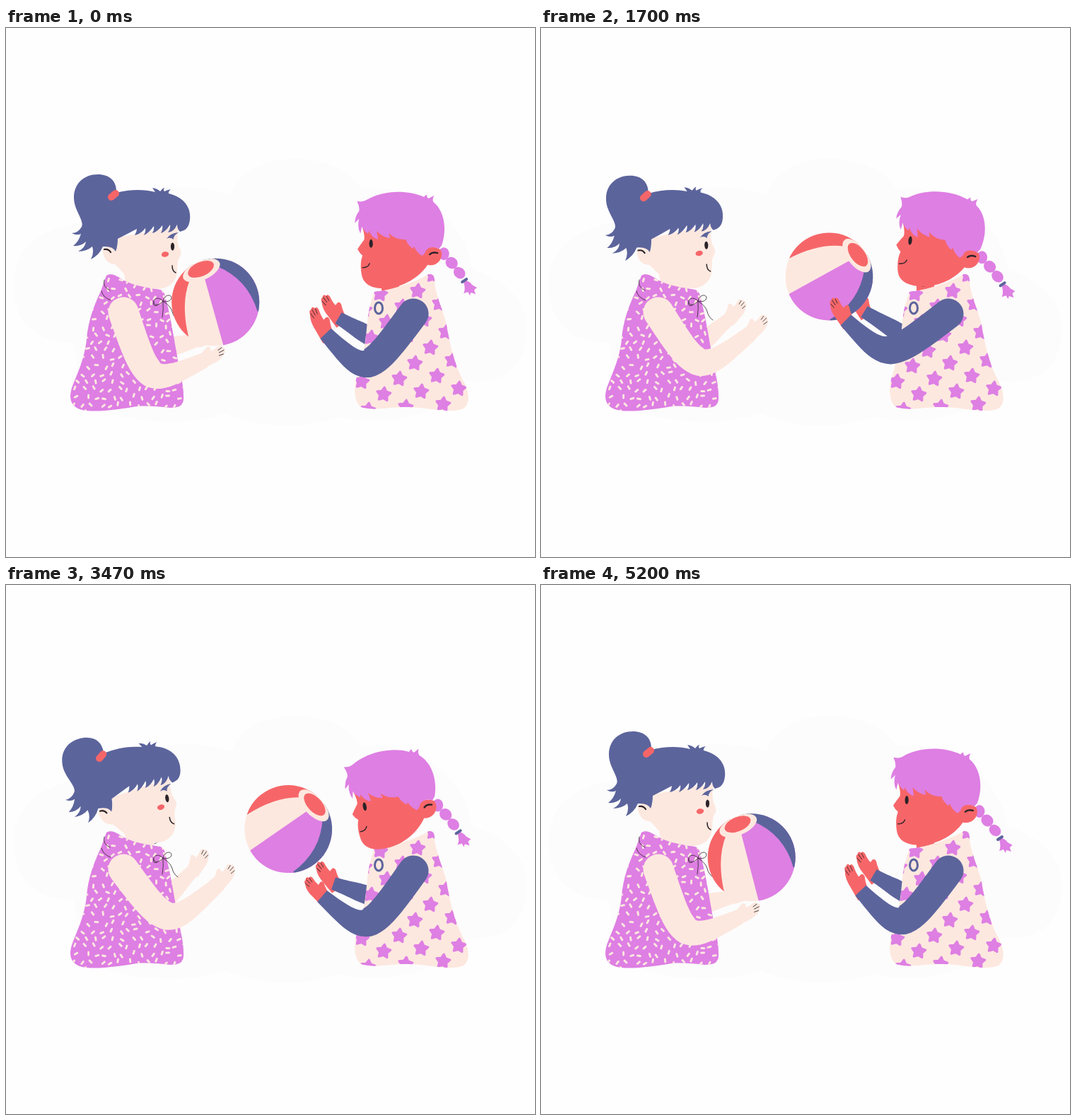
Recreate the animation shown at these times as an HTML page. Size 748 by 748 pixels, loop 5260 ms.

```html
<!DOCTYPE html>
<html lang="en">
<head>
<meta charset="utf-8">
<title>Playing catch</title>
<style>
  html, body { margin: 0; width: 100%; height: 100%; overflow: hidden; background: #fefefe; }
  svg { display: block; width: 100vw; height: 100vh; }
  .navy { fill: #5c649c; }
  .plum { fill: #de7fe3; }
  .peach { fill: #fde8df; }
  .red { fill: #f66669; }
  .ink { fill: #2b2328; }
  .line { fill: none; stroke: #2b2328; stroke-linecap: round; stroke-linejoin: round; }
</style>
</head>
<body>
<svg viewBox="0 0 748 748">
  <defs>
    <clipPath id="dressClip"><use href="#dress"/></clipPath>
    <clipPath id="smockClip"><use href="#smock"/></clipPath>
    <clipPath id="ballClip"><circle r="62"/></clipPath>
    <path id="palm" d="M-8 -10Q3 -11 11 -16Q17 -17 14 -8Q19 -7 26 -9Q31 -9 29.500 -5Q34 -3 30.500 1Q31 5 27 6Q20 12 8 11L-8 11Z"/>
    <path id="fingers" class="line" stroke-width=".8" d="M23 -4L29 -5M23 0L30 0M21 4L27 5"/>
  </defs>

  <path fill="#fcfcfc" d="M11 365C10 305 60 278 125 272C175 222 265 215 318 236C340 170 465 168 503 228C580 218 648 270 660 342C720 360 745 400 735 445C725 490 690 503 650 500C605 558 530 562 470 550C420 568 360 566 310 545C250 565 170 560 110 530L95 445C40 445 12 415 11 365Z"/>

  <g id="farL"></g>
  <g id="farR"></g>

  <!-- girl on the left -->
  <path class="peach" d="M165 335H208L209 370L170 366Z"/>
  <path id="dress" class="plum" d="M142 350C150 345 158 352 167 357C185 366 202 367 218 370Q224 371 226 383C232 405 236 430 241 458C244 480 251 500 251 520C252 534 246 537 232 537C215 535 200 534 185 535C160 539 135 543 113 541C92 538 88 526 93 509C99 492 111 470 114 440C116 415 124 393 134 372Z"/>
  <g clip-path="url(#dressClip)"><path id="specks" fill="none" stroke="#fde8df" stroke-width="2.900" stroke-linecap="round"/></g>
  <path class="line" stroke-width=".8" d="M139 356Q136 366 147 371M135 372Q137 381 148 385"/>
  <path class="line" stroke-width=".8" d="M222 386C214 378 207 384 209 389C212 394 219 390 222 386C224 377 233 376 234 381C234 386 227 388 222 386Q223 398 221 409M223 387Q233 393 235 401Q237 409 243 413M209 387Q207 395 214 392M210 366L215 363"/>
  <g id="headL">
    <path class="peach" d="M158 296L246 280C240 292 243 302 244 308Q250 318 246 323C242 328 243 335 242 345C241 360 228 370 212 369C190 367 172 355 160 340L154 334C142 334 136 322 137 312Q148 304 158 310Z"/>
    <path class="navy" d="M96 240C96 220 110 207 130 207C147 207 157 217 156 233C175 228 195 228 211 232L207 226Q214 227 218 231Q222 226 224 226Q222 229 224 231Q228 229 233 228Q229 231 230 234C250 239 262 252 260 271C259 281 255 286 246 288Q242 284 242 278Q237 289 229 289Q233 284 232 278Q226 288 219 290Q222 285 221 279Q215 288 207 290Q210 284 209 280Q202 290 195 293Q198 287 197 283Q191 291 182 293Q185 288 185 284Q172 291 158 298Q158 309 155 316Q151 308 137 309Q132 321 120 327Q125 318 122 309Q114 316 102 316Q112 311 113 302Q106 309 95 308Q103 302 106 291Q100 294 93 290Q102 290 107 281C111 272 96 258 96 240Z"/>
    <path d="M149 239L155 234" stroke="#f66669" stroke-width="10" stroke-linecap="round"/>
    <path class="line" stroke-width="2.200" d="M139 313Q145 312 148 317"/>
    <path class="navy" d="M227 298Q232 290 244 289Q236 294 237 299Q232 295 227 298Z"/>
    <ellipse class="ink" cx="235.500" cy="309" rx="2.600" ry="5.500"/>
    <ellipse class="red" cx="225" cy="320" rx="5.200" ry="3.700" transform="rotate(-10 225 320)"/>
    <path class="line" stroke-width="1.500" d="M235 336Q235 344 240 346"/>
  </g>

  <!-- girl on the right -->
  <path class="red" d="M531 350H556V366L531 374Z"/>
  <path class="line" stroke-width="1.600" d="M531 363L541 365"/>
  <path id="smock" class="peach" d="M521 373C540 371 575 362 598 348Q606 347 606 357C606 372 616 395 622 415C628 450 634 475 646 498C657 517 656 534 645 539C625 545 600 537 570 536C545 535 520 542 502 536C492 528 492 512 495 497C502 475 508 450 510 425Q512 395 521 373Z"/>
  <g id="stars" class="plum" clip-path="url(#smockClip)" stroke="#de7fe3" stroke-width="3" stroke-linejoin="round"></g>
  <ellipse cx="527" cy="396" rx="5.500" ry="8" fill="none" stroke="#5c649c" stroke-width="3"/>
  <g id="headR">
    <g id="braid">
      <g class="plum">
        <ellipse cx="619" cy="319" rx="7.500" ry="9"/>
        <ellipse cx="630" cy="332" rx="9" ry="8" transform="rotate(40 630 332)"/>
        <ellipse cx="641" cy="346" rx="9" ry="7.500" transform="rotate(45 641 346)"/>
        <path d="M648 356Q656 358 659 363L666 367Q662 369 662 371L664 376Q659 374 657 374L656 378L653 373L647 375Q650 369 647 359Z"/>
      </g>
      <path d="M645 359L651 355" stroke="#5c649c" stroke-width="4" stroke-linecap="round"/>
    </g>
    <path class="red" d="M503 280Q508 295 506 300Q500 308 497 313Q500 319 504 322C501 330 501 340 503 350C506 364 520 369 537 368C562 367 585 352 596 335C612 338 620 322 614 313Q604 307 594 312L590 285Z"/>
    <path class="plum" d="M496 245Q504 247 510 243C530 231 564 227 591 239Q592 236 595 236Q594 239 597 241L605 237Q602 242 604 246C619 258 624 283 616 307L612 312Q601 307 594 314Q592 320 588 322Q580 317 577 309L575 312Q568 307 565 299Q551 300 541 290L543 297Q532 296 524 287L526 299Q517 297 513 287L512 291Q506 288 503 281L501 291Q496 282 499 270L493 276Q493 267 499 259Q500 253 496 245Z"/>
    <path class="line" stroke-width="2.400" d="M599 320Q603 316 610 318"/>
    <ellipse class="ink" cx="516" cy="305" rx="2.600" ry="6"/>
    <path class="line" stroke-width="1.400" d="M504 339Q512 339 514 333"/>
  </g>

  <g id="ball">
    <g clip-path="url(#ballClip)">
      <circle class="peach" r="62"/>
      <path class="red" d="M-70 -70H0L-21 -43Q-46 -18 -54.500 29L-70 30Z"/>
      <path class="plum" d="M0 -40L-14.500 60V70H70V-50Z"/>
      <path class="navy" d="M0 -70H70V40L49 36Q55 -12 22 -46Z"/>
      <ellipse class="peach" cy="-49" rx="28" ry="13.500"/>
      <ellipse class="red" cy="-51" rx="19.500" ry="10"/>
    </g>
  </g>

  <g id="nearL"></g>
  <g id="nearR"></g>
</svg>
<script>
  const PERIOD = 2630;
  const $ = id => document.getElementById(id);
  const place = (el, value) => el.setAttribute("transform", value);

  function ease(from, to, t) {
    const s = Math.min(1, Math.max(0, (t - from) / (to - from)));
    return s * s * (3 - 2 * s);
  }

  // Sum of eased moves; a move may run on into the next period.
  const moves = (t, ...list) => list.reduce((sum, [from, to, by]) =>
    sum + by * (ease(from, to, t) + ease(from, to, t + PERIOD)), 0);

  const point = (x, y) => ({ x, y });

  // Poses hold wrist, fingertip and elbow; without an elbow the arm is straight.
  const girlL = { skin: "peach", sleeve: "peach", flip: 1 };
  const girlR = { skin: "red", sleeve: "navy", flip: -1 };
  const limbs = [
    { ...girlL, id: "nearL", root: point(166, 402), radii: [21.5, 20, 11], poses: {
      base: [point(280, 470), point(309, 455), point(207, 489)],
      reach: [point(302, 421), point(322, 398), point(230, 468)] } },
    { ...girlL, id: "farL", root: point(215, 455), radii: [15, 12.5, 9], poses: {
      base: [point(277, 440), point(303, 432)],
      reach: [point(267, 401), point(284, 376)] } },
    { ...girlR, id: "nearR", root: point(576, 404), radii: [21.5, 20.5, 10.5], poses: {
      base: [point(447, 440), point(424, 416), point(511, 477)],
      toss: [point(431, 413), point(411, 384), point(493, 455)],
      rest: [point(452, 432), point(432, 397), point(511, 474)] } },
    { ...girlR, id: "farR", root: point(530, 445), radii: [14, 12.5, 9], poses: {
      base: [point(463, 422), point(440, 394)],
      toss: [point(457, 401), point(440, 375)],
      rest: [point(470, 410), point(448, 380)] } }
  ];

  // Base pose plus weighted offsets towards the other poses.
  function blend({ base, ...others }, weight) {
    return base.map((b, i) => {
      const p = { ...b };
      for (const name in others) {
        p.x += weight[name] * (others[name][i].x - b.x);
        p.y += weight[name] * (others[name][i].y - b.y);
      }
      return p;
    });
  }

  // Tapered outline around a bent centre line.
  function armPath(root, elbow, wrist, [r0, r1, r2]) {
    const bend = k => (8 * elbow[k] - root[k] - wrist[k]) / 6;
    const ex = bend("x"), ey = bend("y"), steps = 24;
    const one = [], two = [];
    for (let i = 0; i <= steps; i++) {
      const t = i / steps, u = 1 - t, mid = 3 * t * u;
      const x = u ** 3 * root.x + mid * ex + t ** 3 * wrist.x;
      const y = u ** 3 * root.y + mid * ey + t ** 3 * wrist.y;
      const dx = u * u * (ex - root.x) + t * t * (wrist.x - ex);
      const dy = u * u * (ey - root.y) + t * t * (wrist.y - ey);
      const r = t < 0.5 ? r0 + (r1 - r0) * 2 * t : r1 + (r2 - r1) * (2 * t - 1);
      const k = r / (Math.hypot(dx, dy) || 1);
      one.push(`${x - dy * k} ${y + dx * k}`);
      two.unshift(`${x + dy * k} ${y - dx * k}`);
    }
    return `M${one.concat(two).join("L")}A${r0} ${r0} 0 0 0 ${one[0]}Z`;
  }

  for (const limb of limbs) {
    const g = $(limb.id);
    g.innerHTML = `<g><use href="#palm" class="${limb.skin}"/><use href="#fingers"/></g><path class="${limb.sleeve}"/>`;
    [limb.hand, limb.arm] = g.children;
  }

  function speckle() {
    let seed = 11, d = "";
    const rnd = () => (seed = (seed * 16807) % 2147483647) / 2147483647;
    for (let y = 354; y < 542; y += 11)
      for (let x = 92 + (y % 2) * 6; x < 254; x += 13) {
        const px = x + rnd() * 7, py = y + rnd() * 6, a = rnd() * Math.PI;
        const dx = 2 * Math.cos(a), dy = 2 * Math.sin(a);
        d += `M${px - dx} ${py - dy}L${px + dx} ${py + dy}`;
      }
    $("specks").setAttribute("d", d);
  }

  // Slanted lattice of stars.
  function starfield() {
    const shape = Array.from({ length: 10 }, (_, i) => {
      const r = i % 2 ? 5.5 : 10, a = i * Math.PI / 5 - 1.45;
      return [r * Math.cos(a), r * Math.sin(a)];
    });
    let out = "";
    for (let i = -4; i <= 3; i++)
      for (let j = -4; j <= 5; j++)
        out += `<polygon points="${shape}" transform="translate(${578 + 31 * i + 22 * j} ${474 + 18 * i - 22 * j})"/>`;
    $("stars").innerHTML = out;
  }

  function drawLimb({ poses, root, radii, flip, arm, hand }, weight) {
    const [wrist, tip, elbow = point((root.x + wrist.x) / 2, (root.y + wrist.y) / 2)] = blend(poses, weight);
    const dx = tip.x - wrist.x, dy = tip.y - wrist.y;
    const angle = Math.atan2(dy, dx) * 180 / Math.PI;
    arm.setAttribute("d", armPath(root, elbow, wrist, radii));
    place(hand, `translate(${wrist.x} ${wrist.y}) rotate(${angle}) scale(${Math.hypot(dx, dy) / 31} ${0.92 * flip})`);
  }

  function draw(now) {
    const t = now % PERIOD;

    // The ball swings across, follows a parabola and turns as it goes.
    const x = 438 + 147 * moves(t, [2530, 3950, 1], [1260, 2760, -1]);
    const y = 334 + 0.0107 * (x - 367) ** 2;
    place($("ball"), `translate(${x} ${y}) rotate(${0.69 * (x - 296) - 24})`);

    const leanL = 8.6 * moves(t, [60, 560, -1], [700, 2150, 1]);
    const leanR = 16.5 * moves(t, [1180, 1800, 1], [1980, 3450, -1]) - 9.5;
    place($("headL"), `rotate(${leanL} 182 358)`);
    place($("headR"), `rotate(${leanR} 562 362)`);
    place($("braid"), `rotate(${-leanR} 612 315)`); // hangs straight

    const weight = {
      reach: moves(t, [80, 600, 1], [840, 1200, -0.2], [1850, 2630, -0.8]),
      toss: moves(t, [1230, 1640, 1], [1850, 2570, -1]),
      rest: moves(t, [1850, 2570, 1], [2630, 3300, -1])
    };
    for (const limb of limbs) drawLimb(limb, weight);
  }

  speckle();
  starfield();
  const start = performance.now();
  function loop() {
    draw(performance.now() - start);
    requestAnimationFrame(loop);
  }
  loop();
</script>
</body>
</html>
```
